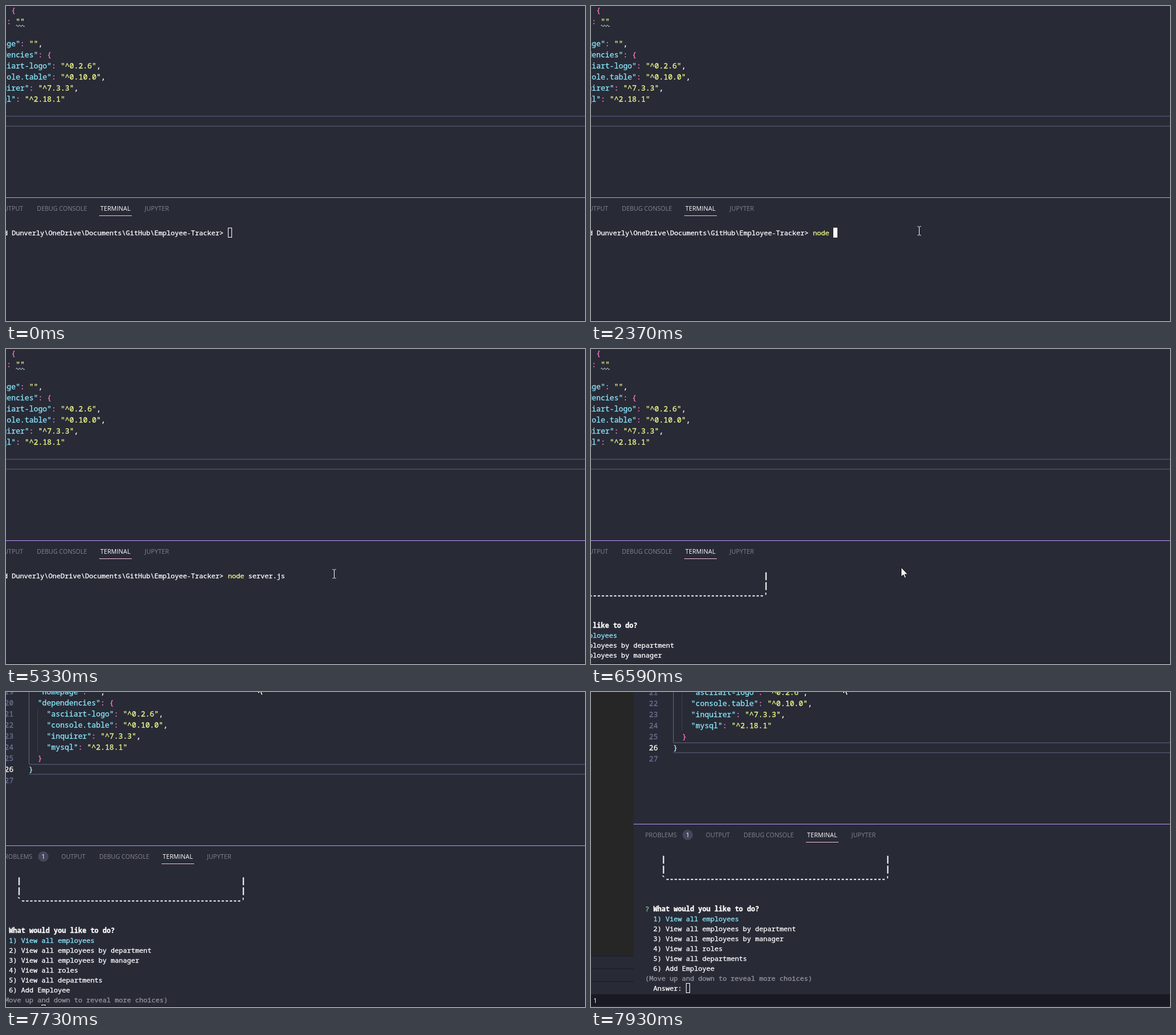
An HTML page that plays this animation: 994 by 540 pixels, repeating every 8 s.

```html
<!DOCTYPE html>
<html lang="en">
<head>
<meta charset="utf-8">
<title>Terminal session</title>
<style>
  html, body { margin: 0; width: 100%; height: 100%; overflow: hidden; background: #282a36; }
  svg { display: block; width: 994px; height: 540px; }
  text { white-space: pre; color: #fff; fill: currentColor; }
  tspan { fill: currentColor; }
  .code, .term, tspan { stroke: currentColor; stroke-width: .3px; }
  .code { font: 12.833px "Noto Sans Mono", monospace; }
  .term { font: 11.667px "Noto Sans Mono", monospace; }
  .bold { font-weight: 700; }
  .frame { font-weight: 700; stroke-width: .6px; }
  .ui { font: 10.5px "Open Sans", sans-serif; }
</style>
</head>
<body>
<svg id="stage" viewBox="0 0 994 540" xmlns="http://www.w3.org/2000/svg"></svg>
<script>
const LOOP = 8000, TICK = 1000 / 15;
const CYAN = '#8be9fd', PINK = '#ff79c6', YELLOW = '#f1fa8c', WHITE = '#ffffff', GREY = '#94959c';
const stage = document.getElementById('stage');

function el(parent, tag, attrs, content) {
  const node = document.createElementNS(stage.namespaceURI, tag);
  for (const k in attrs) node.setAttribute(k, attrs[k]);
  if (content !== undefined) node.textContent = content;
  return parent.appendChild(node);
}
const rect = (parent, x, y, width, height, fill) => el(parent, 'rect', { x, y, width, height, fill });
const show = (node, on) => node.setAttribute('display', on ? 'inline' : 'none');
const move = (node, x, y) => node.setAttribute('transform', `translate(${x} ${y})`);

const world = el(stage, 'g', {});

// Editor: 7.7 x 19 cells
const EX = 141, EW = 7.7;
const rowTop = row => 86 + (row - 26) * 19;

function code(row, col, ...parts) {
  const line = el(world, 'text', { class: 'code', x: EX + col * EW, y: rowTop(row) + 14 });
  for (const [color, str] of parts) el(line, 'tspan', { style: `color:${color}` }, str);
}
const pair = (row, col, key, value, end = '') =>
  code(row, col, [CYAN, `"${key}"`], [PINK, ': '], [YELLOW, `"${value}"`], [WHITE, end]);
const open = (row, key) => code(row, 2, [CYAN, `"${key}"`], [PINK, ': {']);

rect(world, EX, 86, 1300, 2, '#44475a');
rect(world, EX, 103, 1300, 2, '#44475a');
rect(world, EX, rowTop(16), 1, 190, '#666873');
rect(world, 156, rowTop(17), 1, 19, '#3d3f4c');
rect(world, 156, rowTop(21), 1, 76, '#3d3f4c');

open(16, 'bugs');
pair(17, 4, 'url', '');
el(world, 'path', {
  d: `M226 ${rowTop(17) + 17}` + 'q1.25-3 2.5 0t2.5 0'.repeat(3),
  fill: 'none', stroke: '#c8e8e0'
});
code(18, 2, [PINK, '}'], [WHITE, ',']);
pair(19, 2, 'homepage', '', ',');
open(20, 'dependencies');
pair(21, 4, 'asciiart-logo', '^0.2.6', ',');
pair(22, 4, 'console.table', '^0.10.0', ',');
pair(23, 4, 'inquirer', '^7.3.3', ',');
pair(24, 4, 'mysql', '^2.18.1');
code(25, 2, [PINK, '}']);
code(26, 0, ['#b8f0fa', '}']);
for (let n = 16; n <= 27; n++) {
  el(world, 'text', {
    class: 'code', x: 115, y: rowTop(n) + 14, 'text-anchor': 'end',
    style: `color:${n === 26 ? WHITE : '#6a7090'}`
  }, n);
}

// Panel header
rect(world, 73, 226, 1300, 1, '#bd93f9');
rect(world, 369, 257, 56, 1, '#eebfd6');
const tab = (x, name, color = '#83848f', space = 0) =>
  el(world, 'text', { class: 'ui', x, y: 249, style: `color:${color};letter-spacing:${space}px` }, name);
tab(93, 'PROBLEMS');
tab(197, 'OUTPUT');
tab(262, 'DEBUG CONSOLE');
tab(371, 'TERMINAL', WHITE, 0.15);
tab(447, 'JUPYTER', undefined, 0.15);
el(world, 'circle', { cx: 166, cy: 245, r: 9, fill: '#44475a' });
el(world, 'text', { class: 'ui', x: 166, y: 249, 'text-anchor': 'middle' }, '1');

// Terminal: 7 x 17 cells
const TX = 93, TY = 278, TW = 7, TH = 17;
const term = (parent, row, col, str, color = WHITE, weight = '') =>
  el(parent, 'text', {
    class: 'term ' + weight, x: TX + col * TW, y: TY + row * TH + 13, style: `color:${color}`
  }, str);
const hollowCursor = (parent, row, col) =>
  el(parent, 'rect', {
    x: TX + col * TW + 0.5, y: TY + row * TH + 0.5, width: 6, height: 16, fill: 'none', stroke: WHITE
  });

const shell = el(world, 'g', {});
const START = 71;
term(shell, 0, 0, 'PS C:\\Users\\Osrid Dunverly\\OneDrive\\Documents\\GitHub\\Employee-Tracker>');
const command = term(shell, 0, START, '', YELLOW);
const argument = term(shell, 0, START + 5, '');
const hollow = hollowCursor(shell, 0, START);
const block = rect(shell, 0, TY, 7, 17, WHITE);

const banner = el(world, 'g', {});
for (const row of [0, 1]) for (const col of [4, 59]) term(banner, row, col, '|', WHITE, 'frame');
term(banner, 2, 4, '`' + '-'.repeat(54) + "'", WHITE, 'bold');

const menu = el(world, 'g', {});
term(menu, 5, 0, '?', '#7fcf98');
term(menu, 5, 2, 'What would you like to do?', WHITE, 'bold');
['View all employees', 'View all employees by department', 'View all employees by manager',
  'View all roles', 'View all departments', 'Add Employee'
].forEach((item, i) => term(menu, 6 + i, 2, `${i + 1}) ${item}`, i ? WHITE : CYAN));
term(menu, 12, 0, '(Move up and down to reveal more choices)', GREY);
term(menu, 13, 2, 'Answer:');
hollowCursor(menu, 13, 10);

// Sidebar and status bar
rect(world, 0, -120, 73, 572, '#262626');
rect(world, 0, 452, 73, 66, '#282a36');
for (const y of [452, 474, 496]) rect(world, 0, y, 73, 1, '#191a21');
rect(world, 0, 518, 1400, 140, '#191a21');
el(world, 'text', { class: 'ui', x: 4, y: 533, style: 'font-size:11.5px' }, '1');

rect(stage, 0, 538, 994, 2, '#22232d');

// Mouse pointers
const beam = el(stage, 'path', {
  d: 'M-3-7.5H-1M1-7.5H3M-1-7L0-6.5L1-7M0-6.5V6.5M-1 7L0 6.5L1 7M-3 7.5H-1M1 7.5H3',
  fill: 'none', stroke: '#fff'
});
const arrow = el(stage, 'path', {
  d: 'M.5.5V16.5L4.2 13L6.7 18.6L9 17.6L6.6 12.2H11.7Z', fill: '#fff', stroke: '#15161c'
});

const TYPED = 'node server.js';
const KEYS = [1840, 1970, 2100, 2240, 2370, 2630, 2770, 2900, 3090, 3220, 3350, 4410, 4740, 4870];
const ENTRY = [[862, 513], [714, 457], [680, 431], [661, 414], [596, 393], [563, 385]];
const PAN = [[-209, 102], [-167, 68], [-134, 52], [-102, 37], [-67, 23], [-33, 11], [0, 0]];

// Number of ticks shown since start, the first one at start itself
const ticks = (t, start, max) =>
  t < start ? 0 : Math.min(max, Math.floor((t - start + 8) / TICK) + 1);
const mix = (a, b, p) => a + (b - a) * p;

function drawPointer(t) {
  show(beam, t >= 190 && t < 6590);
  show(arrow, t >= 6590);
  const nudged = t >= 850 && t < 980;
  const [x, y] = nudged ? [569, 380] : ENTRY[Math.max(0, ticks(t, 190, 6) - 1)];
  move(beam, x + 0.5, y + 0.5);
  const q = Math.max(0, ticks(t, 6590, 11) - 1) / 10;
  const e = q * q * (3 - 2 * q);
  move(arrow, Math.round(mix(532, 432, e)), Math.round(mix(374, -13, e)));
}

function draw(t) {
  move(world, ...PAN[ticks(t, 7600, 6)]);

  const typed = TYPED.slice(0, KEYS.filter(k => t >= k).length);
  command.textContent = typed.slice(0, 4);
  argument.textContent = typed.slice(5);
  block.setAttribute('x', TX + (START + typed.length) * TW);
  show(hollow, t < 850);
  show(block, t >= 850 && t < 5330);
  show(shell, t < 5590);
  show(banner, t >= 5590);
  show(menu, t >= 5660);
  drawPointer(t);
}

function frame() {
  draw(performance.now() % LOOP);
  requestAnimationFrame(frame);
}
frame();
</script>
</body>
</html>
```
